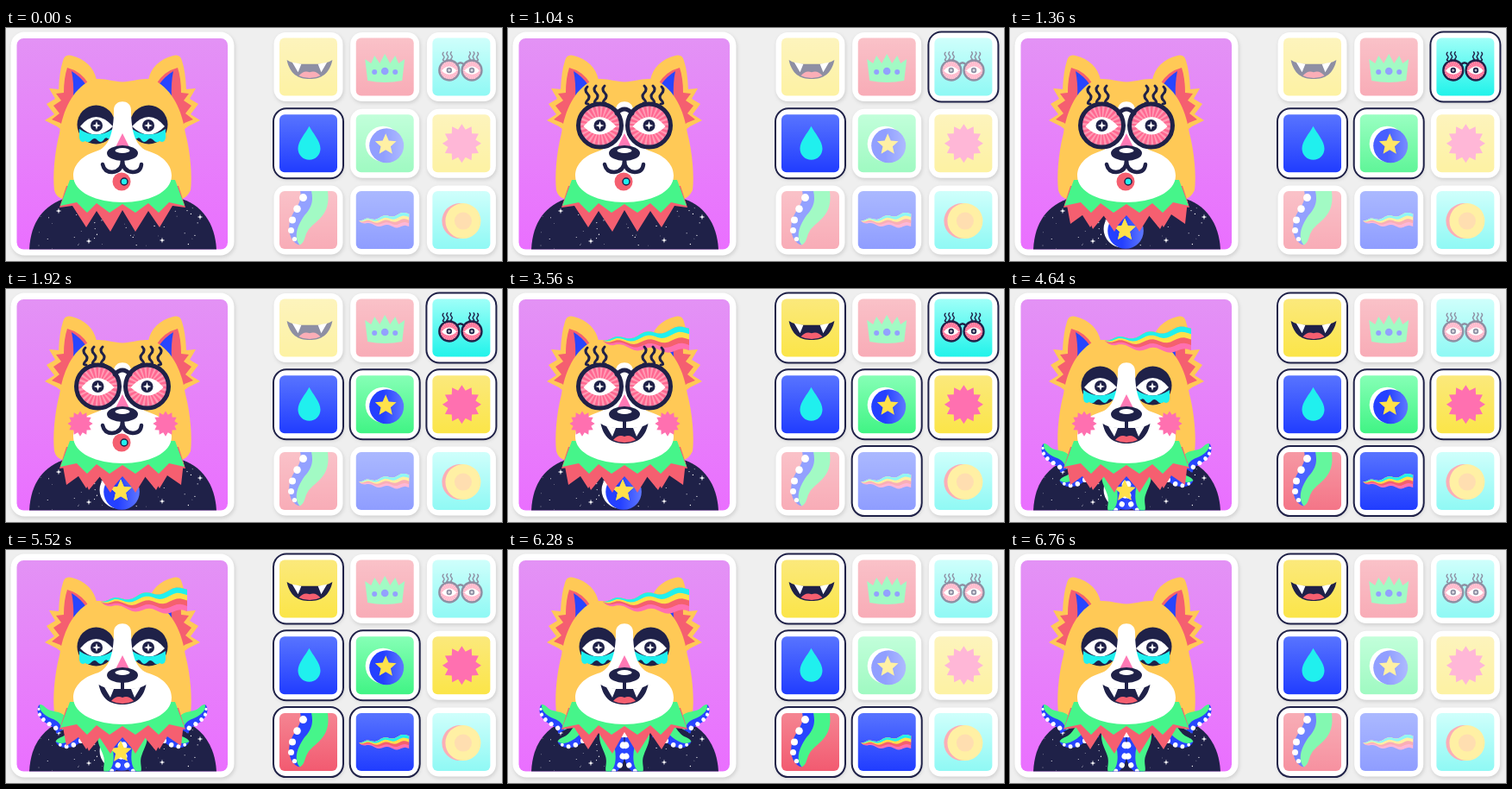
An HTML page for the animation above (6.8 s loop, 575 px wide and 270 px high).

```html
<!DOCTYPE html>
<html lang="en">
<head>
<meta charset="utf-8">
<title>Dog avatar builder</title>
<style>
  html, body { margin: 0; width: 100%; height: 100%; overflow: hidden; background: #efefef; }
  svg { display: block; width: 575px; height: 270px; }
  .card { fill: #fff; filter: drop-shadow(1px 2px 2px #0002); }
  .navy { fill: #1f2148; }
  .line { fill: none; stroke: #1f2148; stroke-linecap: round; stroke-linejoin: round; }
  .white { fill: #fff; }
  .fur { fill: #ffc956; }
  .red { fill: #f55f70; }
  .pink { fill: #ff70b0; }
  .cyan { fill: #20f0ee; }
  .blue { fill: #2845ff; }
  .green { fill: #46f58a; }
  .gold { fill: #ffe14a; }
</style>
</head>
<body>
<svg viewBox="0 0 575 270">
  <defs>
    <linearGradient id="sky" x2="0" y2="1"><stop stop-color="#e392f5"/><stop offset="1" stop-color="#ea6fff"/></linearGradient>
    <linearGradient id="disc"><stop offset=".4" stop-color="#2440ff"/><stop offset="1" stop-color="#5f78ff"/></linearGradient>
    <clipPath id="frame"><rect x="12.500" y="12" width="244.500" height="244.500" rx="8"/></clipPath>
    <clipPath id="tileClip"><rect x="-33.500" y="-33.500" width="67" height="67" rx="6"/></clipPath>

    <g id="ear">
      <path class="fur" d="M66 38Q68 30 76 32C92 36 102 46 105 60L72 124 59 114 45 107 56 100 47 88 57 82 50 70 61 71Q62 50 66 38Z"/>
      <path class="red" d="M71 46Q87 50 96 65L70 118 63 110 53 106 62 99 55 90 64 84 58 76 67 75Q67 58 71 46Z"/>
      <path class="blue" d="M76 50Q86 56 93 66L78 82Q79 64 76 50Z"/>
    </g>
    <g id="eyeball">
      <path class="white" d="M86 114Q104 92 124 114Q104 133 86 114Z"/>
      <circle class="navy" cx="105" cy="113" r="7"/>
      <path class="white" d="M105 108l1.200 3.800 3.800 1.200-3.800 1.200-1.200 3.800-1.200-3.800-3.800-1.200 3.800-1.200z"/>
    </g>
    <g id="eye">
      <ellipse class="navy" cx="104.500" cy="112" rx="22" ry="22.500"/>
      <use href="#eyeball"/>
      <path class="cyan" d="M85 117Q104 130 124 117V126Q122 131 118 128Q115 126 113 130Q110 134 106 130Q103 126 99 130Q96 134 92 131Q86 134 85 127Z"/>
    </g>
    <g id="lens">
      <circle cx="106.500" cy="113" r="25" fill="#ff6791"/>
      <circle cx="106.500" cy="113" r="14" fill="none" stroke="#ff9ab3" stroke-width="20" stroke-dasharray="1.700 1.965"/>
      <use href="#eyeball" x="1.500"/>
      <circle class="line" cx="106.500" cy="113" r="25" stroke-width="5"/>
      <path class="line" stroke-width="3" d="M92 68q-4 4 0 8t0 8t1 4M102 67q-4 4 0 8t0 8t1 4M112 67q-4 4 0 8t0 8t1 4"/>
    </g>
    <g id="glasses">
      <use href="#lens"/><use href="#lens" transform="matrix(-1 0 0 1 270 0)"/>
      <path class="line" stroke-width="5" d="M126 99Q135 89 144 99"/>
    </g>
    <g id="fangs">
      <path class="navy" d="M-27.500-11Q-20-6-10-6H10Q20-6 27.500-11C24 6 14 12 0 12S-24 6-27.500-11Z"/>
      <path class="white" d="M-21-8L-10-6-14 4ZM21-8L10-6 14 4Z"/>
      <path class="red" d="M-13 8Q-7 1 0 4Q7 1 13 8Q7 11 0 11T-13 8Z"/>
    </g>
    <g id="medal">
      <circle class="white" cx="-3" cy="-1" r="20.500"/>
      <circle fill="url(#disc)" cx="1" cy="1" r="20"/>
      <path id="star" class="gold"/>
    </g>
    <path id="burst" class="pink"/>
    <g id="rainbow"></g>
    <g id="tentacle">
      <path class="blue" d="M-10-36C-5-20-17-14-21 0C-25 15-19 27-10 29L4 0 8-36Z"/>
      <g class="white">
        <circle cx="-6" cy="-26" r="4.500"/><circle cx="-13" cy="-13" r="4.300"/><circle cx="-18.500" cy="0" r="4"/>
        <circle cx="-20" cy="12" r="3.500"/><circle cx="-16" cy="22" r="2.700"/>
      </g>
      <path class="green" d="M3-36H22C27-9 12-1 4 7C-6 16-2 25-10 29C-18 19-12 5-4-6C5-16 6-24 3-36Z"/>
    </g>
    <g id="arms">
      <use href="#tentacle" transform="translate(53 191)rotate(150)scale(-.6 .6)"/>
      <use href="#tentacle" transform="translate(77 213)rotate(84)scale(-.7 .7)"/>
      <use href="#tentacle" transform="translate(118 232)rotate(25)scale(-.9 .9)"/>
    </g>
  </defs>

  <rect width="575" height="270" fill="#efefef"/>
  <rect class="card" x="5.500" y="4.500" width="259" height="259" rx="16"/>
  <g clip-path="url(#frame)">
    <rect x="12" y="12" width="246" height="245" fill="url(#sky)"/>
    <use href="#ear"/><use href="#ear" transform="matrix(-1 0 0 1 270 0)"/>
    <path class="navy" d="M27 258C28 226 43 205 70 197H200C228 204 243 228 244 258Z"/>
    <g id="sparkles" class="white"></g>
    <path class="fur" d="M97 61C110 56 122 62.500 135 62.500S160 56 173 61C193 72 204 95 208 122C214 145 216 172 214 188Q210 196 204 198H66Q58 196 56 188C54 172 56 145 62 122C66 95 77 72 97 61Z"/>
    <use data-for="4" href="#medal" transform="translate(133 234)scale(1.040)"/>
    <g data-for="6"><use href="#arms"/><use href="#arms" transform="matrix(-1 0 0 1 270 0)"/></g>
    <use data-for="4" href="#star" transform="translate(133 234)scale(1.040)"/>
    <path class="red" d="M70 183L62 208 77 206 93 231 105 212 121 236 135 211 150 236 165 212 178 231 193 206 208 208 200 183Z"/>
    <path data-for="4" class="red" d="M65 200L70 227 88 214 96 233 110 216 122 232 135 217 148 232 160 216 174 233 184 214 203 227 206 200Z"/>
    <path class="green" d="M74 176L63 206 82 202 94 214 105 203 120 214 135 204 150 214 165 203 177 214 189 202 207 206 196 176Z"/>
    <use href="#eye"/><use href="#eye" transform="matrix(-1 0 0 1 270 0)"/>
    <path class="white" d="M125 95C125 82 145 82 145 95C145 122 151 139 166 143C184 149 192 160 192 171C192 191 164 202 135 202S78 191 78 171C78 160 86 149 104 143C119 139 125 122 125 95Z"/>
    <path fill="#ff79b5" d="M135 122L144 140H126Z"/>
    <g id="smile">
      <circle class="red" cx="134" cy="178" r="10.500"/>
      <circle class="cyan" cx="137" cy="178" r="4" stroke="#1f2148" stroke-width="1.500"/>
      <path class="line" stroke-width="4.500" d="M112 158Q114 167 123 167Q135 166 135 153Q135 166 147 167Q156 167 157 158"/>
    </g>
    <g data-for="0">
      <use href="#fangs" x="135" y="167"/>
      <path class="line" stroke-width="4" d="M135 152V162"/>
    </g>
    <ellipse class="navy" cx="135" cy="145" rx="18" ry="9"/>
    <ellipse class="white" cx="135" cy="142" rx="8.500" ry="3"/>
    <g data-for="5"><use href="#burst" transform="translate(86 156)scale(.65)"/><use href="#burst" transform="translate(185 156)scale(.65)"/></g>
    <use data-for="7" href="#rainbow" x="110" y="43"/>
    <use data-for="2" href="#glasses"/>
  </g>
  <g id="tiles"></g>
</svg>
<script>
const LOOP = 6800, STEP = 40, FADED = 0.5;
const $ = id => document.getElementById(id);

function spikes(points, outer, inner) {
  let d = '';
  for (let i = 0; i < points * 2; i++) {
    const r = i % 2 ? inner : outer, a = i * Math.PI / points - Math.PI / 2;
    d += (i ? 'L' : 'M') + (r * Math.cos(a)).toFixed(2) + ' ' + (r * Math.sin(a)).toFixed(2);
  }
  return d + 'Z';
}
$('star').setAttribute('d', spikes(5, 13, 6));
$('burst').setAttribute('d', spikes(12, 22.5, 16.5));

// Wavy band, pointed at the left; share is the part of its thickness to fill.
function band(share) {
  const top = [], bottom = [];
  for (let x = 0; x <= 100; x += 4) {
    const wave = 2.5 * Math.min(1, x / 15);
    const y = 17 - 0.16 * x;
    top.push(`${x} ${y - wave * Math.cos((x - 15) / 5.7)}`);
    bottom.unshift(`${x} ${y - wave * Math.cos((x - 15 - 6 * share) / 5.7) + share * 28 * (x / 100) ** 0.65}`);
  }
  return `M${top.join('L')}L${bottom.join('L')}Z`;
}
$('rainbow').innerHTML = ['#ff70b0', '#f5606e', '#ffe04a', '#20f0ee']
  .map((color, i) => `<path fill="${color}" d="${band(1 - i / 4)}"/>`).join('');

let seed = 7;
const random = () => (seed = seed * 16807 % 2147483647) / 2147483647;
let stars = '';
for (let i = 0; i < 45; i++) {
  const x = 38 + random() * 196, y = 206 + random() * 50;
  stars += `<circle cx="${x}" cy="${y}" r="${0.3 + random() * 0.4}"/>`;
}
for (const [x, y] of [[61, 212], [96, 247], [181, 246], [225, 219]])
  stars += `<path d="${spikes(4, 3.4, 1)}" transform="translate(${x} ${y})"/>`;
$('sparkles').innerHTML = stars;

const yellow = ['#fbe97c', '#fbe548'], red = ['#f58592', '#f25a70'];
const cyan = ['#a0fff8', '#20f3ea'], blue = ['#5874ff', '#203cff'], green = ['#86ffb6', '#40f484'];

// on: selected, off: outline and accessory vanish, fade: tile starts dimming
const tiles = [
  { colors: yellow, on: 2640, rise: 80, icon: '<use href="#fangs" transform="translate(1.500 2.500)scale(.96)"/>' },
  { colors: red, icon: `<path class="green" d="M-23-9L-16-4-12-13-6-4 0-15 6-4 12-13 16-4 23-9 20 16Q0 20-20 16Z"/>
    <g class="blue"><circle cx="-12" cy="6" r="3"/><circle cy="5" r="4.300"/><circle cx="12" cy="6" r="3"/></g>` },
  { colors: cyan, on: 1040, off: 4280, icon: '<use href="#glasses" transform="translate(-1 4)scale(.46)translate(-135 -113)"/>' },
  { colors: blue, on: -1000, icon: '<path class="cyan" d="M1-20C5-12 14-3 14 6A13 13 0 0 1-12 6C-12-3-3-12 1-20Z"/>' },
  { colors: green, on: 1280, off: 6200, fall: 80, icon: '<use href="#medal" x="1" y="1.500"/>' },
  { colors: yellow, on: 1800, off: 5520, icon: '<use href="#burst" x=".5"/>' },
  { colors: red, on: 4560, fade: 6680, icon: '<use href="#tentacle"/>' },
  { colors: blue, on: 3560, off: 6400, icon: '<use href="#rainbow" transform="translate(-30 -9)scale(.58)"/>' },
  { colors: cyan, icon: `<circle class="red" cx="-2" cy="1" r="20.500"/><circle class="gold" cx="2" cy="1" r="20.500"/>
    <circle cx="2" cy="1" r="10" fill="#ffbd62"/>` },
];

$('tiles').innerHTML = tiles.map(({ colors: [top, bottom], icon }, i) => `
  <linearGradient id="tile${i}" x2="0" y2="1"><stop stop-color="${top}"/><stop offset="1" stop-color="${bottom}"/></linearGradient>
  <g transform="translate(${350.5 + i % 3 * 88.7} ${45 + Math.floor(i / 3) * 88.8})">
    <rect class="card" x="-40" y="-40" width="80" height="80" rx="14"/>
    <rect class="line" data-for="${i}" x="-40.500" y="-40.500" width="81" height="81" rx="15" stroke-width="2"/>
    <g id="face${i}" clip-path="url(#tileClip)"><rect x="-34" y="-34" width="68" height="68" fill="url(#tile${i})"/>${icon}</g>
  </g>`).join('');

const parts = tiles.map((_, i) => document.querySelectorAll(`[data-for="${i}"]`));
const faces = tiles.map((_, i) => $('face' + i));
const clamp = v => Math.max(0, Math.min(1, v));

function draw(now) {
  const t = Math.floor(now % LOOP / STEP) * STEP;
  tiles.forEach(({ on = Infinity, off = LOOP, fade = off, rise = 120, fall = 120 }, i) => {
    const active = t >= on && t < off;
    const level = t < on ? 0 : clamp((t - on) / rise) - clamp((t - fade) / fall);
    parts[i].forEach(part => part.style.display = active ? '' : 'none');
    faces[i].style.opacity = FADED + (1 - FADED) * level;
  });
  $('smile').style.display = t >= tiles[0].on ? 'none' : '';
}
function tick() {
  draw(performance.now());
  requestAnimationFrame(tick);
}
tick();
</script>
</body>
</html>
```
